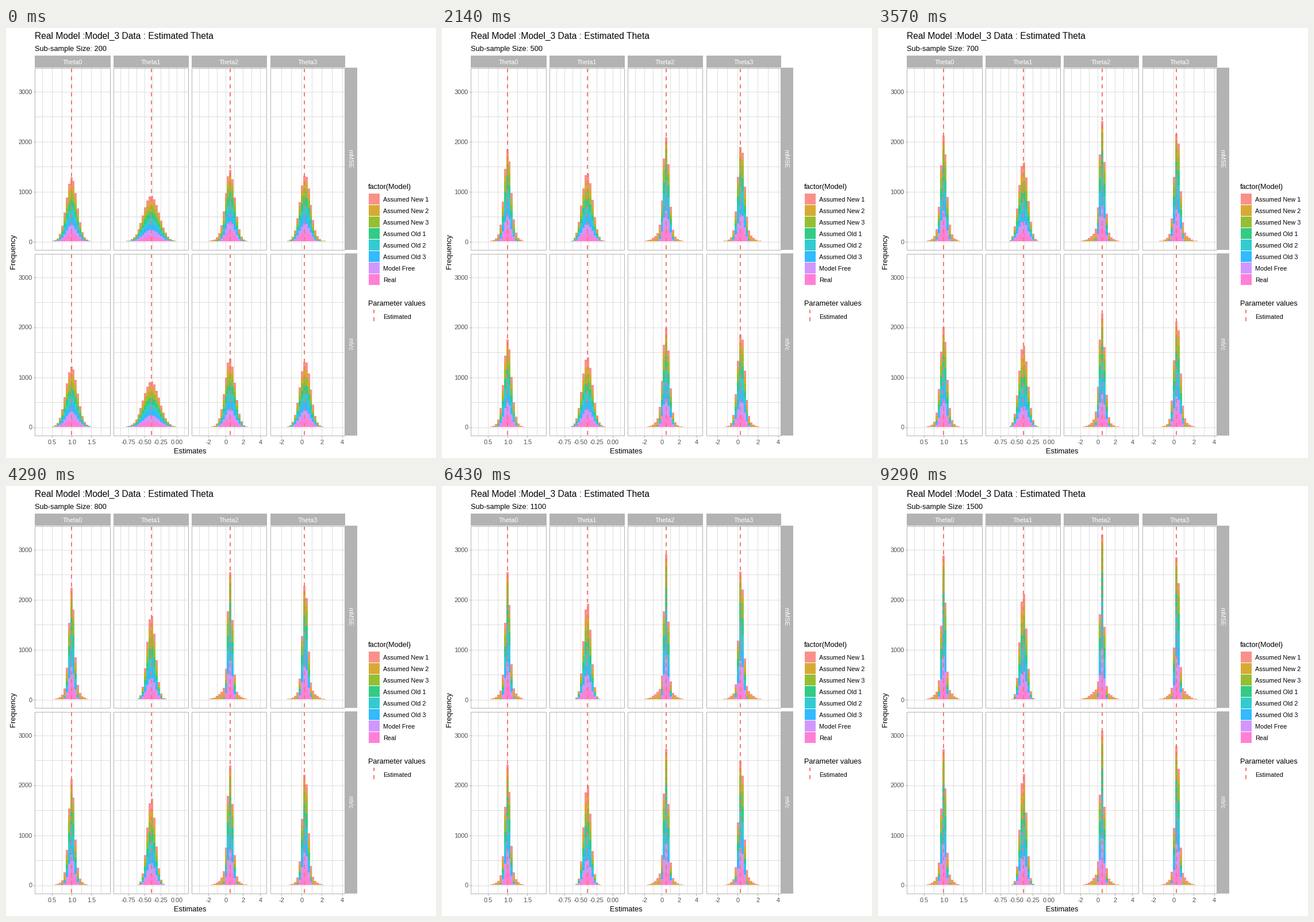
Animation, 748 px wide and 748 px high, one loop 10000 ms. Source, as a matplotlib script:

```python
import math
from functools import lru_cache

import matplotlib.pyplot as plt
from matplotlib.animation import FuncAnimation
from matplotlib.collections import LineCollection, PolyCollection
from matplotlib.patches import Rectangle

SIZE = 748
PX = 0.72  # points per pixel at 100 dpi
plt.rcParams["font.family"] = "Liberation Sans"

LOOP = 10000
TICK = 50
SAMPLE_SIZES = range(200, 1501, 100)
BIN = 3.945
PER_COUNT = 0.0870
ROWS = [("mMSE", 69, 371.3), ("mVc", 392, 694.0)]
ROW_H = 316
GRID, FRAME, INK = "#DEDEDE", "#B3B3B3", "#4D4D4D"

# Stacking order, bottom to top; the last two models have the wide spread
MODELS = [("Real", "#FF61CC"), ("Model Free", "#C77CFF"),
          ("Assumed Old 3", "#00A9FF"), ("Assumed Old 2", "#00BFC4"),
          ("Assumed Old 1", "#00BE67"), ("Assumed New 3", "#7CAE00"),
          ("Assumed New 2", "#CD9600"), ("Assumed New 1", "#F8766D")]

# left, right, ticks, pixel of the first tick, tick step, true value, peak bin edge
COLUMNS = [
    ("Theta0", 50, 181, ["0.5", "1.0", "1.5"], 80.4, 34.2, 114, 111.6),
    ("Theta1", 187, 317, ["-0.75", "-0.50", "-0.25", "0.00"], 213.3, 27.9, 253, 252.2),
    ("Theta2", 323, 453, ["-2", "0", "2", "4"], 352.0, 30.3, 390, 388.4),
    ("Theta3", 460, 589, ["-2", "0", "2", "4"], 479.3, 35.3, 519, 516.7),
]

# narrow mean, narrow sd at n = 1500, wide mean, wide sd (in bins), shrink power
SPREAD = [
    [(0.13, 0.865, 0.2, 2.8, 0.5), (-0.35, 1.37, -0.3, 1.7, 0.45),
     (-0.05, 0.725, -0.8, 3.3, 0.5), (0.33, 0.80, 1.0, 3.1, 0.5)],
    [(0.13, 0.94, 0.2, 2.6, 0.5), (-0.33, 1.30, -0.3, 1.6, 0.48),
     (-0.05, 0.80, -0.7, 2.7, 0.5), (0.33, 0.85, 0.8, 2.6, 0.5)],
]

fig = plt.figure(figsize=(SIZE / 100, SIZE / 100), dpi=100, facecolor="white")
ax = fig.add_axes([0, 0, 1, 1])
ax.set_xlim(0, SIZE)
ax.set_ylim(SIZE, 0)
ax.axis("off")


def label(x, y, s, size=10.9, color="black", ha="left", **kw):
    kw.setdefault("va", "baseline")
    return ax.text(x, y, s, fontsize=size * PX, color=color, ha=ha, **kw)


def lines(segments, color, z):
    ax.add_collection(LineCollection(segments, colors=color, linewidths=PX,
                                     antialiaseds=False, zorder=z), autolim=False)


def box(x, y, w, h, **kw):
    ax.add_patch(Rectangle((x, y), w, h, antialiased=False, **kw))


def dashes(x, bottom, top):
    ax.plot([x, x], [bottom, top], color="#F8766D", lw=2 * PX, zorder=6,
            dashes=(3.5, 3.5), dash_capstyle="butt")


def pixel(v):
    return math.floor(v) + 0.5


def grid_lines(col, row):
    _, left, right, ticks, first, step = col[:6]
    _, top, zero = row
    ys = [pixel(zero - 500 * i * PER_COUNT) for i in range(7)]
    xs = [pixel(first + step * i / 2) for i in range(-1, 2 * len(ticks))]
    return ([[(left, y), (right, y)] for y in ys]
            + [[(x, top), (x, top + ROW_H)] for x in xs
               if left + 3 < x < right - 2])


def draw_static():
    label(50.5, 19, "Real Model :Model_3 Data : Estimated Theta", 15.6)
    label(320.5, 740, "Estimates", 12.9, ha="center")
    label(13, 389, "Frequency", 12.9, ha="center", va="center", rotation=90)

    grid, marks = [], []
    for col in COLUMNS:
        name, left, right, ticks, first, step, truth, _ = col
        box(left, 48, right - left + 1, 21, fc=FRAME, lw=0)
        label((left + right) / 2, 63, name, color="white", ha="center")
        for row in ROWS:
            top = row[1]
            grid += grid_lines(col, row)
            dashes(truth, top + ROW_H, top)
            box(left + 0.5, top + 0.5, right - left, ROW_H, fill=False,
                ec=FRAME, lw=PX, zorder=7)
        for i, tick in enumerate(ticks):
            x = first + step * i
            marks.append([(pixel(x), 709), (pixel(x), 712)])
            label(x, 724, tick, color=INK, ha="center")

    for name, top, zero in ROWS:
        box(590, top, 21, ROW_H + 1, fc=FRAME, lw=0)
        label(598.5, top + ROW_H / 2, name, color="white", ha="center",
              va="center", rotation=270)
        for count in range(0, 3001, 1000):
            y = zero - count * PER_COUNT
            marks.append([(48, pixel(y)), (51, pixel(y))])
            label(45.5, y + 4.5, str(count), color=INK, ha="right")
    lines(grid, GRID, 1)
    lines(marks, FRAME, 3)

    label(630, 280, "factor(Model)", 12.75)
    for i, (name, color) in enumerate(reversed(MODELS)):
        y = 288 + 20 * i
        box(631, y, 19, 19, fc=color, alpha=0.8, lw=0)
        label(656, y + 13.5, name)
    label(630, 483, "Parameter values", 12.75)
    dashes(640, 510, 490)
    label(656, 506, "Estimated")


def share(k, mean, sd):
    """Probability of a normal value falling in bin k."""
    def cdf(v):
        return 0.5 * (1 + math.erf((v - mean) / (sd * math.sqrt(2))))
    return cdf(k + 0.5) - cdf(k - 0.5)


@lru_cache(maxsize=None)
def histogram(n):
    """Stacked bar corners for every model."""
    verts = [[] for _ in MODELS]
    for (_, _, zero), spreads in zip(ROWS, SPREAD):
        for col, (m, s, wm, ws, power) in zip(COLUMNS, spreads):
            sd = s * (1500 / n) ** power
            wide_sd = max(ws, 1.1 * sd)
            for k in range(-13, 14):
                x0 = round(col[-1] + k * BIN)
                x1 = round(col[-1] + (k + 1) * BIN)
                narrow = round(1000 * share(k, m, sd))
                wide = round(1000 * share(k, wm, wide_sd))
                total = 0
                for i, bars in enumerate(verts):
                    y0 = round(zero - total * PER_COUNT)
                    total += wide if i >= 6 else narrow
                    y1 = round(zero - total * PER_COUNT)
                    if y1 < y0:
                        bars.append([(x0, y0), (x1, y0), (x1, y1), (x0, y1)])
    return verts


draw_static()
subtitle = label(50.5, 40, "", 12.7)
stacks = []
for _, color in MODELS:
    stack = PolyCollection([], facecolors=color, edgecolors="none", alpha=0.8,
                           linewidths=0, antialiaseds=False, zorder=4)
    ax.add_collection(stack, autolim=False)
    stacks.append(stack)


def update(i):
    # A size holds from the tick in which its share of the loop begins
    step = (i * TICK + TICK - 1) * len(SAMPLE_SIZES) // LOOP
    n = SAMPLE_SIZES[step]
    subtitle.set_text(f"Sub-sample Size: {n}")
    for stack, verts in zip(stacks, histogram(n)):
        stack.set_verts(verts)
    return [subtitle, *stacks]


anim = FuncAnimation(fig, update, frames=LOOP // TICK, interval=TICK,
                     repeat=True, repeat_delay=0, blit=False)
plt.show()
```
